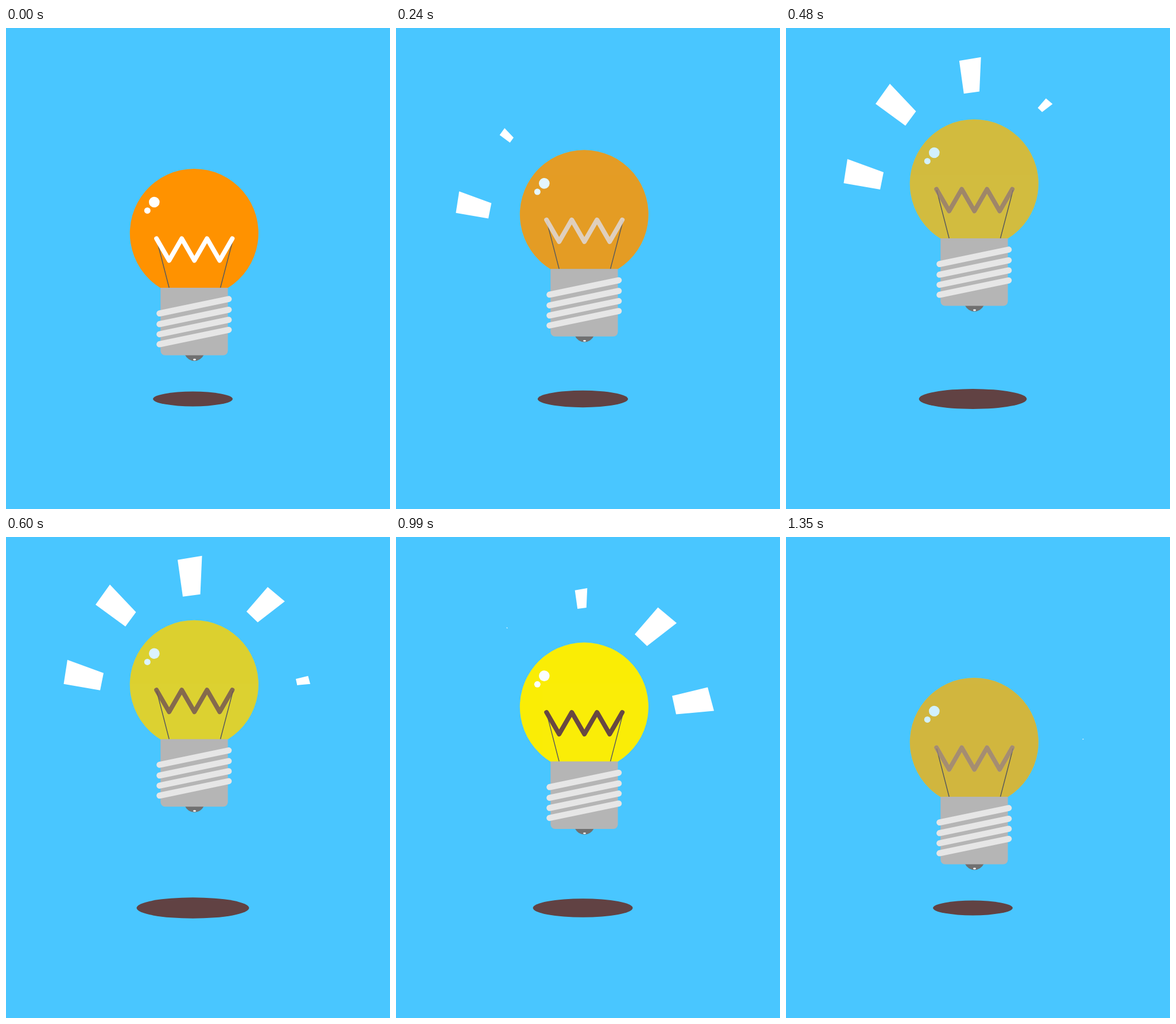
Write an HTML page that moves like this. It is 669 px wide and 837 px high and loops after 1380 ms.

```html
<!DOCTYPE html>
<html lang="en">
<head>
<meta charset="utf-8">
<title>Light bulb</title>
<style>
  html, body { margin: 0; width: 100%; height: 100%; overflow: hidden; background: #49c6ff; }
  svg { display: block; width: 100%; height: 100%; }
  .line { fill: none; stroke-linecap: round; stroke-linejoin: round; }
</style>
</head>
<body>
<svg viewBox="0 0 669 837">
  <defs>
    <path id="glass" d="M269.4 452.5A112 112 0 1 1 386.2 452.5Z"/>
    <g id="shine" fill="#fff"><circle cx="258.3" cy="303" r="9.3"/><circle cx="246.3" cy="317.7" r="5.5"/></g>
    <path id="zigzag" class="line" stroke-width="8" d="M262.2 366.5l22 38 22-38 22 38 22-38 22 38 22-38"/>
  </defs>
  <ellipse id="shadow" cx="325.5" cy="645.5" fill="#614243"/>
  <g id="lamp">
    <g id="rays" fill="#fff"></g>
    <g class="lit"><use href="#glass" fill="#fff200"/><use href="#shine"/></g>
    <g class="dim"><use href="#glass" fill="#ff9200"/><use href="#shine"/></g>
    <path d="M262.5 368L284.2 452M395.5 368L373.5 452" stroke="#5b5b5b" stroke-width="1.5"/>
    <use class="dim" href="#zigzag" stroke="#fff"/>
    <use class="lit" href="#zigzag" stroke="#644344"/>
    <path d="M312 569A18 18 0 0 0 344.5 569Z" fill="#707070"/>
    <ellipse cx="328.5" cy="577" rx="2.5" ry="1.4" fill="#fff"/>
    <path d="M269.3 452H386.5V561.5a8 8 0 0 1-8 8H277.3a8 8 0 0 1-8-8Z" fill="#b5b5b5"/>
    <path class="line" stroke="#e6e6e6" stroke-width="10.6"
      d="M267.5 496.7L388 471.6M267.5 515.3L388 490.2M267.5 532.9L388 507.8M267.5 550.3L388 525.2"/>
  </g>
</svg>
<script>
const STEP = 30, STEPS = 46, LIFT = 102.8;
const $ = id => document.getElementById(id);

// Each ray: the point it grows from, then its corners.
const rays = [
  [[135.3, 340.5], '107,314 170,337 164,367 100.5,356'],
  [[193.5, 219.5], '181,183 226.5,231 208,256 156,218'],
  [[324.7, 168.5], '299,140 341.5,133 338.5,200 308,204'],
  [[451, 222], '456.5,183 490,211 437,252 415,231'],
  [[517.5, 352], '481,338 543,323 554,364 488,370']
].map(([origin, points]) => {
  const node = document.createElementNS('http://www.w3.org/2000/svg', 'polygon');
  node.setAttribute('points', points);
  $('rays').append(node);
  return { node, origin };
});

const smooth = x => {
  x = Math.min(1, Math.max(0, x));
  return x * x * (3 - 2 * x);
};

// Cubic bezier (1/3, 0, .59, 1): softer landing at the top than at the bottom.
const hover = x => {
  let s = x;
  for (let i = 0; i < 12; i++) s = x + .23 * s * s * (1 - s);
  return smooth(s);
};

const setOpacity = (selector, value) =>
  document.querySelectorAll(selector).forEach(node => node.setAttribute('opacity', value));

function draw(step) {
  const height = hover(1 - Math.abs(step - 22.5) / 22.5);
  const glow = smooth(1 - Math.abs(step - 30) / 30);
  $('lamp').setAttribute('transform', `translate(0 ${-LIFT * height})`);
  $('shadow').setAttribute('rx', 69.4 * (1 + .422 * height));
  $('shadow').setAttribute('ry', 12.9 * (1 + .422 * height));
  setOpacity('.lit', glow);
  setOpacity('.dim', 1 - glow);
  rays.forEach(({ node, origin: [x, y] }, i) => {
    const age = step - 4 * i - .05;
    const size = smooth(age / 10) - smooth((age - 20) / 10);
    node.setAttribute('transform', `translate(${x} ${y}) scale(${size}) translate(${-x} ${-y})`);
  });
}

function tick() {
  draw(Math.floor(performance.now() / STEP + 1e-6) % STEPS);
  requestAnimationFrame(tick);
}
tick();
</script>
</body>
</html>
```
